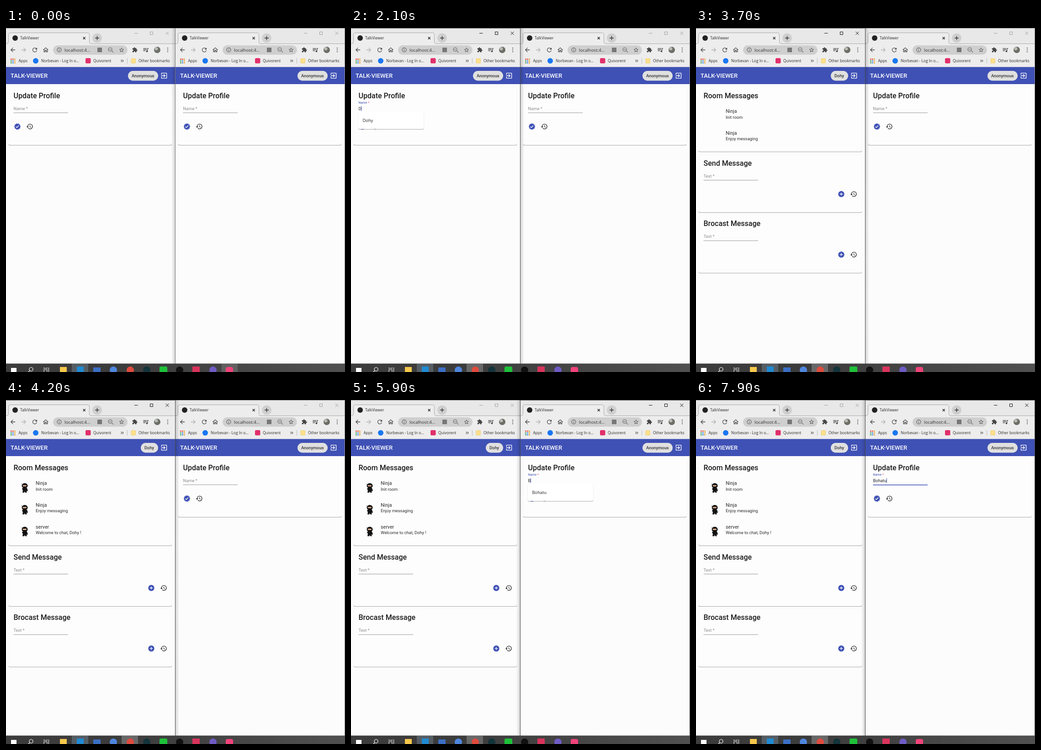
Write an HTML page that moves like this. It is 742 px wide and 754 px high and loops after 8000 ms.

```html
<!DOCTYPE html>
<html lang="en">
<head>
<meta charset="utf-8">
<title>Chat demo</title>
<style>
  html, body { margin: 0; width: 100%; height: 100%; overflow: hidden; background: #fcfcfc; }
  svg { display: block; width: 100vw; height: 100vh; }
  text { font-family: Roboto, sans-serif; white-space: pre; }
  .ui { font-family: "Open Sans", "Noto Sans", sans-serif; }
</style>
</head>
<body>
<svg id="stage" viewBox="0 0 742 754"></svg>
<script>
const LOOP = 8000, STEP = 100;
const INDIGO = '#3f51b5', INK = '#222', GREY = '#8b8b8b';
const stage = document.getElementById('stage');
const pen = document.createElement('canvas').getContext('2d');

const ICONS = {
  back: 'M20 11H7.83l5.59-5.59L12 4l-8 8 8 8 1.41-1.41L7.83 13H20v-2z',
  next: 'M4 11h12.17l-5.59-5.59L12 4l8 8-8 8-1.41-1.41L16.17 13H4v-2z',
  reload: 'M17.65 6.35A8 8 0 1 0 19.73 14h-2.08A6 6 0 1 1 12 6c1.66 0 3.14.69 4.22 1.78L13 11h7V4l-2.35 2.35z',
  home: 'M12 5.69l5 4.5V18h-2v-6H9v6H7v-7.81l5-4.5M12 3L2 12h3v8h6v-6h2v6h6v-8h3L12 3z',
  info: 'M11 7h2v2h-2zm0 4h2v6h-2zM12 2a10 10 0 1 0 0 20 10 10 0 0 0 0-20zm0 18a8 8 0 1 1 0-16 8 8 0 0 1 0 16z',
  star: 'M22 9.24l-7.19-.62L12 2 9.19 8.63 2 9.24l5.46 4.73L5.82 21 12 17.27 18.18 21l-1.63-7.03L22 9.24zM12 15.4l-3.76 2.27 1-4.28-3.32-2.88 4.38-.38L12 6.1l1.71 4.04 4.38.38-3.32 2.88 1 4.28L12 15.4z',
  puzzle: 'M20.5 11H19V7a2 2 0 0 0-2-2h-4V3.5a2.5 2.5 0 0 0-5 0V5H4a2 2 0 0 0-2 2v3.8h1.5a2.7 2.7 0 0 1 0 5.4H2V20a2 2 0 0 0 2 2h3.8v-1.5a2.7 2.7 0 0 1 5.4 0V22H17a2 2 0 0 0 2-2v-4h1.5a2.5 2.5 0 0 0 0-5z',
  queue: 'M15 6H3v2h12V6zm0 4H3v2h12v-2zM3 16h8v-2H3v2zM17 6v8.18A3 3 0 1 0 19 17V8h3V6h-5z',
  exit: 'M10.09 15.59L11.5 17l5-5-5-5-1.41 1.41L12.67 11H3v2h9.67l-2.58 2.59zM19 3H5a2 2 0 0 0-2 2v4h2V5h14v14H5v-4H3v4c0 1.1.89 2 2 2h14a2 2 0 0 0 2-2V5a2 2 0 0 0-2-2z',
  check: 'M23 12l-2.44-2.79.34-3.69-3.61-.82-1.89-3.2L12 2.96 8.6 1.5 6.71 4.69 3.1 5.5l.34 3.7L1 12l2.44 2.79-.34 3.7 3.61.82L8.6 22.5l3.4-1.47 3.4 1.46 1.89-3.19 3.61-.82-.34-3.69L23 12zm-12.91 4.72l-3.8-3.81 1.48-1.48 2.32 2.33 5.85-5.87 1.48 1.48-7.33 7.35z',
  history: 'M13 3a9 9 0 0 0-9 9H1l3.89 3.89.07.14L9 12H6c0-3.87 3.13-7 7-7s7 3.13 7 7-3.13 7-7 7c-1.93 0-3.68-.79-4.94-2.06l-1.42 1.42A8.95 8.95 0 0 0 13 21a9 9 0 0 0 0-18zm-1 5v5l4.28 2.54.72-1.21-3.5-2.08V8H12z',
  add: 'M12 2a10 10 0 1 0 0 20 10 10 0 0 0 0-20zm5 11h-4v4h-2v-4H7v-2h4V7h2v4h4v2z'
};

const rect = (x, y, w, h, fill, more = '') =>
  `<rect x="${x}" y="${y}" width="${w}" height="${h}" fill="${fill}" ${more}/>`;
const dot = (x, y, r, fill, more = '') => `<circle cx="${x}" cy="${y}" r="${r}" fill="${fill}" ${more}/>`;
const line = (d, color, width = 1) =>
  `<path d="${d}" fill="none" stroke="${color}" stroke-width="${width}"/>`;
const text = (x, y, size, s, fill = INK, more = '') =>
  `<text x="${x}" y="${y}" font-size="${size}" fill="${fill}" ${more}>${s}</text>`;
const ui = (x, y, size, s, fill = '#2a2a2a') => text(x, y, size, s, fill, 'class="ui"');
const icon = (name, cx, cy, fill = '#444', k = 2 / 3) =>
  `<path d="${ICONS[name]}" fill="${fill}" transform="translate(${cx - 12 * k} ${cy - 12 * k}) scale(${k})"/>`;
const title = (y, s) => text(16.5, y, 16, s, '#1c1c1c', 'font-weight="500"');
const mix = (a, b, p) => `rgb(${a.map((v, i) => Math.round(v + (b[i] - v) * p))})`;
const since = (t, times) => times.filter(v => t >= v).length;

function browser(active) {
  const ctl = active ? '#111' : '#a0a0a0';
  const tab = 'M0 34.5H1Q5.5 34.5 5.5 30V15Q5.5 10.5 10 10.5H178Q182.5 10.5 182.5 15V30Q182.5 34.5 187 34.5H371';
  let s = rect(0, 0, 371, 86, '#e8e8e8') + `<path d="${tab}V86H0z" fill="#ededed"/>` + line(tab, '#a3a3a3', .9);
  s += dot(20, 22, 6, '#222') + ui(31, 25, 8.4, 'TalkViewer');
  s += line('M168.7 19.7l5 5m0-5l-5 5', '#222', 1.3);
  s += dot(199.5, 22, 10.5, '#d0d0d0') + line('M195 22h9m-4.5-4.5v9', '#333', 1.4);
  s += line('M281 11.5h7.5M315.5 8.5h6v6h-6zM349.5 8l7 7m0-7l-7 7', ctl);

  s += icon('back', 15, 48, '#444', .64) + icon('next', 39, 48, '#b0b0b0', .64);
  s += icon('reload', 63, 48, '#444', .64) + icon('home', 87, 48, '#444', .62);
  s += rect(103, 38, 163, 20.5, '#cfcfcf', 'rx="10.2"');
  s += icon('info', 116.5, 48, '#444', .5) + ui(128, 51.5, 9.7, 'localhost:4...', '#333');
  s += rect(200, 43, 10, 10, '#777');
  s += line('M231.7 50.2l3.5 3.5', '#666', 1.2) + line('M226 47h4', '#666') +
       dot(228, 47, 4, 'none', 'stroke="#666" stroke-width="1.2"');
  s += icon('star', 253, 48, '#555', .55) + icon('puzzle', 282, 48, '#444', .53);
  s += icon('queue', 306, 48, '#444', .62);
  s += dot(331, 48, 7, '#6b6f66') + dot(329, 45.5, 3.5, '#b9bab3');
  s += [44, 48, 52].map(y => dot(354, y, 1.1, '#444')).join('');

  const tints = ['#e14b3b', '#e14b3b', '#e9a32b', '#3fa35a', '#4285f4', '#e9a32b', '#3fa35a', '#4285f4', '#e9a32b'];
  s += tints.map((c, i) => rect(10 + i % 3 * 4, 67 + (i / 3 | 0) * 4, 2.6, 2.6, c)).join('');
  s += ui(27.5, 75, 8.4, 'Apps') + dot(65, 72, 6, '#1877f2') + ui(77, 75, 8.4, 'Norbevan - Log In o...');
  s += rect(174, 66, 11.5, 11.5, '#e1306c', 'rx="2.5"') + ui(191, 75, 8.4, 'Quivorent');
  s += line('M251.5 69.5l2.3 2.5-2.3 2.5m3.2-5l2.3 2.5-2.3 2.5', '#444', 1.1);
  s += line('M265.5 66v12', '#bdbdbd');
  s += rect(274, 67, 9.5, 10, '#ffe08a', 'stroke="#e8c660" stroke-width=".7" rx="1"');
  return s + ui(290, 75, 8.4, 'Other bookmarks');
}

function header(user) {
  const x = user === 'Anonymous' ? 267 : 295;
  return rect(0, 85.5, 371, 37.5, INDIGO) +
    text(10, 109, 13.1, 'TALK-VIEWER', '#fff', 'font-weight="500"') +
    rect(x, 94, 333 - x, 21.5, '#e0e0e0', 'rx="10.75"') +
    text(x + 8, 108, 9.33, user, '#333', 'font-weight="500"') +
    icon('exit', 346, 104.5, '#fff', .7);
}

const card = (top, bottom) =>
  rect(6.5, top, 356.5, bottom - top, '#fdfdfd', 'rx="3" stroke="#000" stroke-opacity=".015"') +
  line(`M6 ${bottom - 2}q.5 2 3 2H360q2.5 0 3-2`, '#a6a6a6', 1.1);

const underline = (y, focused) => focused
  ? line(`M16.5 ${y + .4}H136`, INDIGO, 1.5)
  : line(`M16.5 ${y}H136`, '#8c8c8c', .9);

function menu(items) {
  const h = items.length > 1 ? 172.5 : 39;
  return rect(15.5, 184, 144, h, '#000', 'rx="3" opacity=".1"') +
    rect(16, 183.5, 143, h, '#000', 'rx="3" opacity=".22"') +
    rect(16, 183, 143, h - .5, '#fff', 'rx="3"') +
    items.map((s, i) => ui(25.5, 206 + i * 26.7, 9.3, s, '#1c1c1c')).join('');
}

// p: how far the label has floated; f: { typed, caret, list }
function profile(p, f) {
  const color = mix([139, 139, 139], [63, 81, 181], p);
  const mark = mix([139, 139, 139], [244, 67, 100], Math.min(1, p * 2.5));
  let s = card(130, 257) + title(153.5, 'Update Profile');
  s += text(16.5, 179.7 - 14.2 * p, 9.33 - 2.33 * p, `Name <tspan fill="${mark}">*</tspan>`, color);
  s += underline(185.8, p > 0);
  s += icon('check', 25, 216, INDIGO) + icon('history', 52, 216, INK);
  if (f.list) s += menu(f.list);
  s += text(16.5, 179.7, 9.33, f.typed);
  if (f.caret) {
    pen.font = '9.33px Roboto, sans-serif';
    const x = 16.7 + pen.measureText(f.typed).width;
    s += line(`M${x} 171V182`, INDIGO, .9);
  }
  return s;
}

const ninja = y => `<g transform="translate(41 ${y})">` +
  line('M-7.5 -9l4 5', '#8fb0cc', 1.3) +
  '<path d="M-5 1h10l2 6-2 1-1-2 .5 5h-3.5l-1-3-1 3h-4l1-6-2-1z" fill="#111"/>' +
  '<ellipse cx="0" cy="-4" rx="6.5" ry="5.8" fill="#111"/>' +
  rect(-4.5, -5.5, 8.5, 3, '#d9a98a', 'rx="1.4"') + '</g>';

function room(count, faces) {
  const rows = [['Ninja', 'Init room'], ['Ninja', 'Enjoy messaging'], ['server', 'Welcome to chat, Dohy !']];
  const shift = (count - 2) * 48;
  let s = card(130, 271.5 + shift) + title(153.5, 'Room Messages');
  rows.slice(0, count).forEach(([who, what], i) => {
    const y = 186 + i * 47.8;
    s += text(65, y, 10.67, who, '#2b2b2b') + text(65, y + 12.5, 9.33, what, '#2b2b2b');
    if (faces) s += ninja(y + 6);
  });
  ['Send Message', 'Brocast Message'].forEach((name, i) => {
    const y = 278 + shift + i * 132.7;
    s += card(y, y + 126.5) + title(y + 23.7, name);
    s += text(16.5, y + 49.5, 9.33, 'Text *', GREY) + underline(y + 55.5);
    s += icon('add', 318, y + 86, INDIGO) + icon('history', 345, y + 86, INK);
  });
  return s;
}

const NAMES = ['kim@m.example', 'Ulrit', 'Wow', 'Yee', 'Hmm', 'Dorb'];

// Typing state of one form; `off` holds the spans with a hidden caret
function form(t, word, focus, keys, off) {
  if (t < focus) return { typed: '', caret: false, list: null };
  const n = since(t, keys);
  return {
    typed: word.slice(0, n),
    caret: !off.some(([a, b]) => t >= a && t < b),
    list: n === 0 ? NAMES : n < word.length ? [word] : null
  };
}

const float = (t, start, length) => 1 - Math.pow(1 - Math.min(1, Math.max(0, (t - start) / length)), 3);

function frameOf(x, active, user, body) {
  const edge = active ? '#4a4a4a' : '#8a8a8a';
  return `<g transform="translate(${x} 0)">` + rect(0, 0, 371, 736, '#fcfcfc') +
    browser(active) + header(user) + body + line('M0 .5H371', edge) + '</g>';
}

function taskbar(t) {
  let s = rect(0, 735.5, 742, 18.5, 'url(#bar)') + rect(144, 736, 36, 18, '#555d64');
  if (t < 800) s += rect(472, t < 700 ? 736 : 744, 35, 18, '#606060');
  else s += rect(253, 736, 36, 18, '#686868');
  s += rect(11, 745, 12, 12, '#fff');
  s += dot(55, 748, 4, 'none', 'stroke="#fff" stroke-width="1.2"') + line('M52 751l-4 4', '#fff', 1.3);
  s += line('M83 744v2h7v-2M83 749h7v6h-7zM93.5 744v12', '#eee', 1.1);
  s += rect(118, 743, 15, 12, '#f5c84c') + rect(155, 742, 15, 14, '#1f8ad2') + rect(191, 744, 16, 12, '#3b6fc4');
  s += dot(235, 750, 8, '#4f86dd') + dot(272, 750, 8, '#df4b3e') + dot(308, 750, 8, '#12343a');
  s += rect(336, 742, 17, 16, '#1fc13a', 'rx="3"') + dot(380, 750, 8, '#111');
  s += rect(408, 742, 16, 16, '#d9345c') + dot(453, 750, 8, '#6f5bc4') + rect(481, 743, 16, 16, '#f0437a', 'rx="4"');
  return s;
}

const DEFS = `<defs>
  <linearGradient id="dim"><stop offset="0" stop-opacity="0"/><stop offset="1" stop-opacity=".16"/></linearGradient>
  <linearGradient id="bar"><stop offset=".35" stop-color="#3c3c3c"/><stop offset="1" stop-color="#505050"/></linearGradient>
</defs>`;

function draw(t) {
  const leftOn = t >= 700 && t < 5000, rightOn = t >= 5000;
  const leftForm = form(t, 'Dohy', 700, [2100, 2300, 2600, 2800], [[1200, 1700], [3300, LOOP]]);
  const rightForm = form(t, 'Bohatu', 5000, [5900, 6200, 7100, 7300, 7700, 7900], [[5500, 5900], [6700, 7100]]);
  const leftBody = t < 3700
    ? profile(float(t, 660, 340), leftForm)
    : room(t < 3900 ? 2 : 3, t >= 3800);
  const rightBody = profile(float(t, 4932, 368), rightForm);

  stage.innerHTML = DEFS +
    frameOf(0, leftOn, t < 3400 ? 'Anonymous' : 'Dohy', leftBody) +
    frameOf(371, rightOn, 'Anonymous', rightBody) +
    (leftOn
      ? rect(0, 0, 8, 736, 'url(#dim)', 'transform="matrix(-1 0 0 1 379 0)"')
      : rect(362, 0, 8, 736, 'url(#dim)')) +
    line('M370.5 0V736', leftOn || rightOn ? '#4a4a4a' : '#777') +
    line('M741.5 0V736', rightOn ? '#4a4a4a' : '#8a8a8a') +
    taskbar(t);
}

let shown = -1;
function tick() {
  const t = Math.floor(performance.now() % LOOP / STEP) * STEP;
  if (t !== shown) draw(shown = t);
  requestAnimationFrame(tick);
}
tick();
</script>
</body>
</html>
```
